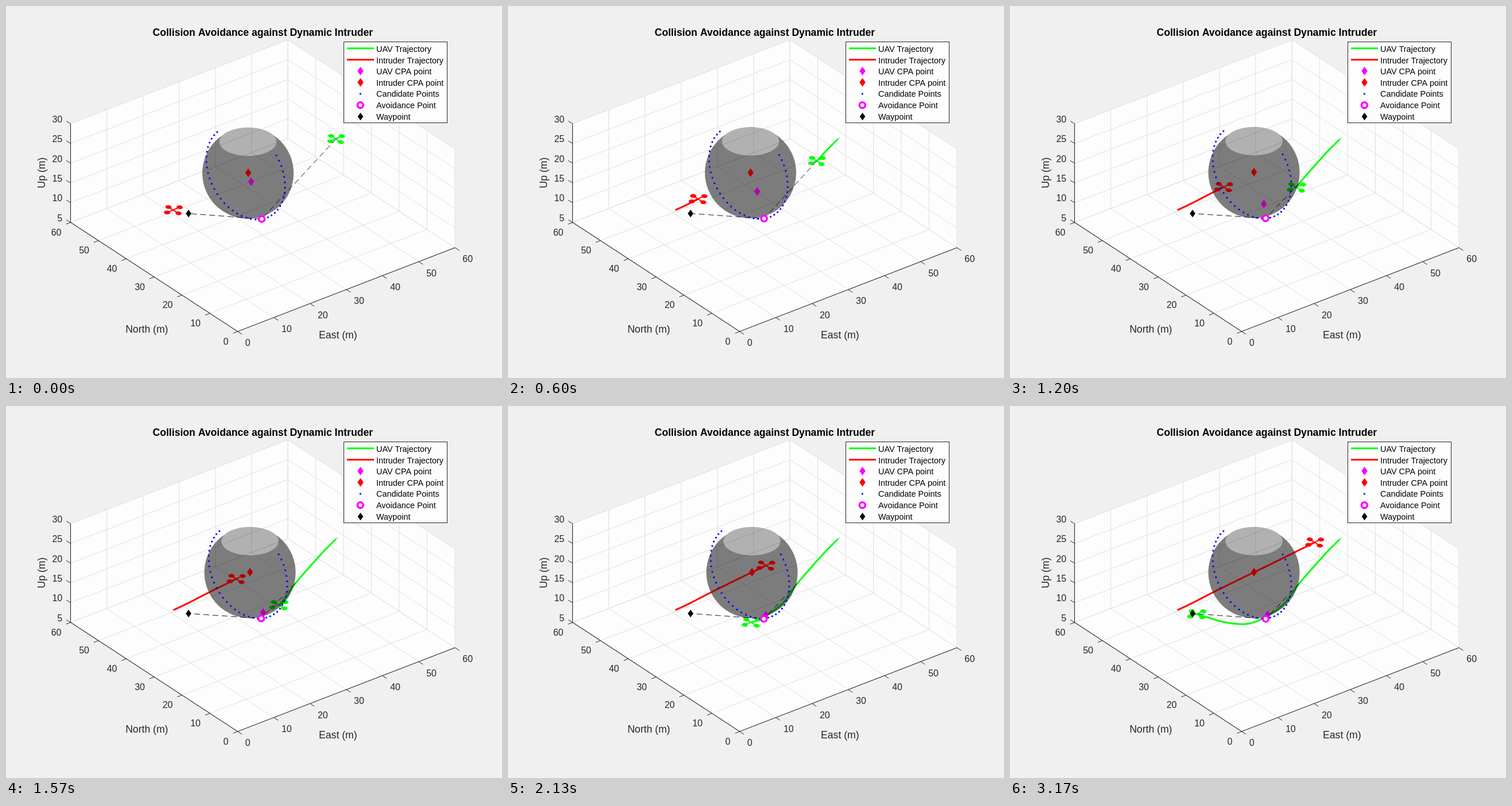
An HTML page with a canvas that plays this animation: 864 px wide and 648 px high, repeating every 3210 ms.

```html
<!DOCTYPE html>
<html lang="en">
<head>
<meta charset="utf-8">
<title>Collision Avoidance</title>
<style>
html, body { margin: 0; width: 100%; height: 100%; overflow: hidden; background: #f0f0f0; }
canvas { display: block; }
</style>
</head>
<body>
<canvas id="stage" width="864" height="648"></canvas>
<script>
const ctx = document.getElementById('stage').getContext('2d');
const LOOP = 3210, STEP = 100 / 3, LAST = 95;
const INK = '#262626', GRID = '#dfdfdf', GREEN = '#00ff00', RED = '#ff0000', PINK = '#ff00ff';
const FONT = '"Liberation Sans", Arial, sans-serif';

// Orthographic projection of east, north, up (metres)
const project = (e, n, u) => [
  403.5 + e * 378.5 / 60 - n * 291 / 60,
  567 - e * 146 / 60 - n * 190 / 60 - (u - 5) * 172 / 25
];

// Tracks: time, x, y
const uavKeys = [[0, 575, 231.5], [330, 553, 253.5], [870, 523, 287], [1120, 504, 309],
  [1570, 475, 347], [2130, 424, 377], [2570, 382, 378], [3170, 325, 362.5]];
const intruderKeys = [[0, 291.5, 355.5], [330, 315, 344.5], [870, 348, 327.5], [1570, 401.5, 301],
  [2130, 449, 278], [2570, 483.5, 261], [3170, 531, 237.5]];
const sphereKeys = [[0, 421.5, 291], [330, 422.5, 291], [870, 422.5, 289.7], [1200, 425, 290]];
const ringKeys = [[0, 417.5, 290.5], [330, 418.5, 290.5], [870, 419, 288.5], [1200, 421.5, 288.7]];
const uavCpaKeys = [[0, 427, 306], [330, 431, 315], [870, 437, 331], [1570, 448, 360], [1800, 449, 364]];
const redCpaKeys = [[0, 422, 290.5], [330, 422, 291], [870, 423, 289.5], [1200, 425, 289.5]];
const avoidKeys = [[0, 445.5, 371], [330, 446, 371], [870, 446, 369.5], [1570, 444.5, 370], [1800, 445.5, 370.7]];
const WAYPOINT = [318, 361.5], FREEZE = 1120;

function slope(keys, i, d) {
  const a = keys[Math.max(i - 1, 0)], b = keys[Math.min(i + 1, keys.length - 1)];
  return (b[d] - a[d]) / (b[0] - a[0]);
}

function at(keys, t, smooth) {
  const end = keys.length - 1;
  if (t >= keys[end][0]) return keys[end].slice(1);
  let i = 0;
  while (t >= keys[i + 1][0]) i++;
  const a = keys[i], b = keys[i + 1], span = b[0] - a[0], s = (t - a[0]) / span;
  return [1, 2].map(d => {
    if (!smooth) return a[d] + (b[d] - a[d]) * s;
    const r = 1 - s;
    return a[d] * (1 + 2 * s) * r * r + b[d] * s * s * (3 - 2 * s)
      + span * (slope(keys, i, d) * s * r * r - slope(keys, i + 1, d) * s * s * r);
  });
}

function line(points, color, width = 1, dash = []) {
  ctx.strokeStyle = color;
  ctx.lineWidth = width;
  ctx.setLineDash(dash);
  ctx.beginPath();
  points.forEach(p => ctx.lineTo(p[0], p[1]));
  ctx.stroke();
  ctx.setLineDash([]);
}

function fillPath(points, color) {
  ctx.fillStyle = color;
  ctx.beginPath();
  points.forEach(p => ctx.lineTo(p[0], p[1]));
  ctx.fill();
}

function text(str, x, y, size, align = 'center', weight = 'normal', color = INK) {
  ctx.font = `${weight} ${size}px ${FONT}`;
  ctx.textAlign = align;
  ctx.fillStyle = color;
  ctx.fillText(str, x, y + size * 0.36);
}

function diamond([x, y], color, w = 5.3, h = 7.5) {
  fillPath([[x, y - h], [x + w, y], [x, y + h], [x - w, y]], color);
}

function ring([x, y]) {
  ctx.beginPath();
  ctx.arc(x, y, 5, 0, 7);
  ctx.fillStyle = '#fff';
  ctx.fill();
  ctx.strokeStyle = PINK;
  ctx.lineWidth = 3.6;
  ctx.stroke();
}

function dot(x, y) {
  ctx.fillStyle = '#0000f0';
  ctx.fillRect(x - 1.4, y - 1.4, 2.8, 2.8);
}

function drone([x, y], color, wide) {
  const rotors = [[-8.5, -5.3], [wide, -5], [-wide, 4.2], [wide - 2, 5.6]]
    .map(([dx, dy]) => [x + dx, y + dy]);
  line([rotors[0], rotors[3]], color, 2);
  line([rotors[1], rotors[2]], color, 2);
  ctx.fillStyle = color;
  for (const [rx, ry] of rotors) {
    ctx.beginPath();
    ctx.ellipse(rx, ry, 5.4, 3.3, 0.08, 0, 7);
    ctx.fill();
  }
}

function trail(keys, k, color) {
  const points = [];
  for (let i = 0; i <= k; i++) points.push(at(keys, i * STEP, true));
  line(points, color, 3);
}

function drawAxes() {
  ctx.fillStyle = '#f0f0f0';
  ctx.fillRect(0, 0, 864, 648);
  fillPath([project(0, 60, 5), project(0, 60, 30), project(60, 60, 30),
    project(60, 0, 30), project(60, 0, 5), project(0, 0, 5)], '#fdfdfe');
  for (let v = 0; v <= 60; v += 10) {
    line([project(v, 0, 5), project(v, 60, 5), project(v, 60, 30)], GRID);
    line([project(0, v, 5), project(60, v, 5), project(60, v, 30)], GRID);
  }
  for (let u = 5; u <= 30; u += 5)
    line([project(0, 60, u), project(60, 60, u), project(60, 0, u)], GRID);

  line([project(60, 0, 5), project(0, 0, 5), project(0, 60, 5), project(0, 60, 30)], INK, 1.1);
  for (let v = 0; v <= 60; v += 10) {
    const [ex, ey] = project(v, 0, 5), [nx, ny] = project(0, v, 5);
    line([[ex, ey], [ex + 7.5, ey + 4.9]], INK);
    line([[nx, ny], [nx - 8, ny + 3.1]], INK);
    text(v, ex + 13.3, ey + 19.5, 16, 'left');
    text(v, nx - 16, ny + 17, 16, 'right');
  }
  for (let u = 5; u <= 30; u += 5) {
    const [x, y] = project(0, 60, u);
    line([[x, y], [x - 7.5, y - 4.5]], INK);
    text(u, x - 14.3, y - 8, 16, 'right');
  }
  text('East (m)', 578.3, 572.5, 17.6);
  text('North (m)', 245.3, 562.3, 17.6);
  ctx.save();
  ctx.translate(62, 290.5);
  ctx.rotate(-Math.PI / 2);
  text('Up (m)', 0, 0, 17.6);
  ctx.restore();
  text('Collision Avoidance against Dynamic Intruder', 447.3, 46, 17.6, 'center', 'bold', '#000');
}

function drawLegend() {
  ctx.fillStyle = '#fdfdfe';
  ctx.fillRect(588.5, 62, 180, 142);
  ctx.strokeStyle = INK;
  ctx.lineWidth = 1;
  ctx.strokeRect(588.5, 62.5, 180, 141);
  ['UAV Trajectory', 'Intruder Trajectory', 'UAV CPA point', 'Intruder CPA point',
    'Candidate Points', 'Avoidance Point', 'Waypoint']
    .forEach((s, i) => text(s, 645, 74.7 + i * 19.65, 14.4, 'left', 'normal', '#000'));
  line([[594, 73.8], [641, 73.8]], GREEN, 3);
  line([[594, 93.5], [641, 93.5]], RED, 3);
  diamond([617.5, 113.3], PINK);
  diamond([617.5, 133], RED);
  dot(617.3, 153);
  ring([617.3, 172.7]);
  diamond([617.5, 192.5], '#000', 4.8, 6.8);
}

// Front and back halves are two translucent layers; the open top shows only the back one.
function sphereLayer([x, y], front) {
  ctx.fillStyle = 'rgba(0,0,0,0.3)';
  ctx.beginPath();
  ctx.arc(x, y, 79.5, 0, 7);
  if (front) ctx.ellipse(x, y - 54.6, 49.7, 24.8, 0, 0, 2 * Math.PI);
  ctx.fill('evenodd');
}

function draw(k) {
  const t = k * STEP;
  const uav = at(uavKeys, t, true), intruder = at(intruderKeys, t, true);
  const sphere = at(sphereKeys, t), avoid = at(avoidKeys, t);
  drawAxes();

  trail(uavKeys, k, GREEN);
  drone(uav, GREEN, t < 1000 ? 10 : 11.5);
  line([at(uavKeys, Math.min(t, FREEZE), true), avoid, WAYPOINT], '#14143c', 1, [10, 6]);
  line([[576, 230.5], [577.2, 229.2]], INK);

  sphereLayer(sphere, false);
  trail(intruderKeys, k, RED);
  drone(intruder, RED, 11);
  diamond(at(redCpaKeys, t), RED);
  diamond(at(uavCpaKeys, t), PINK);
  sphereLayer(sphere, true);

  const [cx, cy] = at(ringKeys, t);
  for (let i = 0; i < 40; i++) {
    const a = (-38.5 + i * 262 / 39) * Math.PI / 180;
    dot(cx + 68.5 * Math.cos(a), cy + 23.5 * Math.cos(a) + 78 * Math.sin(a));
  }
  ring(avoid);
  diamond(WAYPOINT, '#000', 4.8, 6.8);
  drawLegend();
}

const start = performance.now();
function tick() {
  const t = (performance.now() - start) % LOOP;
  draw(Math.min(LAST, Math.floor((t + 4) / STEP)));
  requestAnimationFrame(tick);
}
tick();
</script>
</body>
</html>
```
